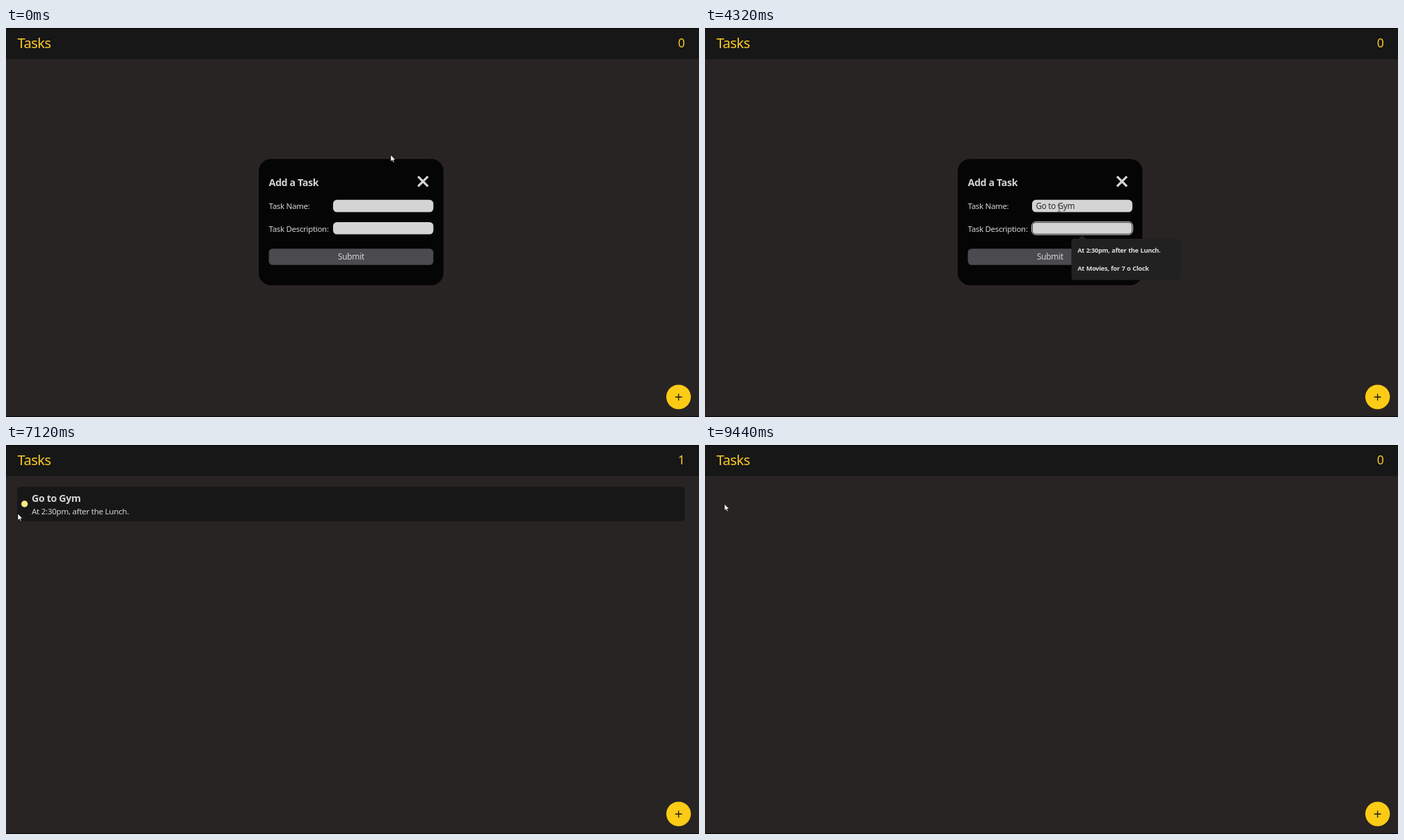
An HTML page for the animation above (9.52 s loop, 998x561 px).

```html
<!DOCTYPE html>
<html lang="en">
<head>
<meta charset="utf-8">
<title>Tasks</title>
<style>
  html, body { margin: 0; width: 100%; height: 100%; overflow: hidden; background: #292524; }
  svg { display: block; width: 998px; height: 561px; }
  text { font: 11.45px "Noto Sans", "Open Sans", sans-serif; letter-spacing: -.025em; fill: #d4d4d4; white-space: pre; }
  .brand { font-size: 20.2px; letter-spacing: -.03em; fill: #fbca24; }
  .count { font-size: 17.5px; fill: #fbca24; text-anchor: middle; letter-spacing: 0; }
  .title { font-size: 14.2px; font-weight: 600; }
  .entry { font-size: 11.75px; fill: #2c2c30; }
  .hint { font-size: 9.2px; font-weight: 700; letter-spacing: -.03em; word-spacing: .6px; fill: #dedede; }
  .ring rect { fill: none; stroke-width: .9; }
  .ring .out { stroke: #e0e0e0; }
  .ring .in { stroke: #111; }
</style>
</head>
<body>
<svg viewBox="0 0 998 561">
  <defs>
    <clipPath id="inner"><rect x="474" y="245" width="136" height="56"/></clipPath>
  </defs>
  <rect width="998" height="561" fill="#282423"/>
  <rect width="998" height="45" fill="#171717"/>
  <path d="M0 .5H998M0 560.5H998" stroke="#050505"/>
  <text class="brand" x="16.5" y="28.6">Tasks</text>
  <text class="count" id="count" x="972.7" y="27.6">0</text>

  <g id="task">
    <rect id="card" x="16" y="60" width="961.5" height="50" rx="5.5"/>
    <circle cx="26.7" cy="85" r="4.7" fill="#fdea86"/>
    <text class="title" x="37" y="82.2" fill="#e5e5e5">Go to Gym</text>
    <text x="37" y="100" style="font-size:11.6px">At 2:30pm, after the Lunch.</text>
  </g>

  <circle cx="968.6" cy="532.1" r="17.7" fill="#fccb16"/>
  <path d="M963.7 532.3H973.5M968.6 527.4V537.2" stroke="#1c1917" stroke-width="1.4"/>

  <g id="modal">
    <rect x="364" y="189" width="266" height="182" rx="17.5" fill="#050505"/>
    <text class="title" x="378.5" y="227.8">Add a Task</text>
    <path d="M593.4 214.2L607.6 228.4M607.6 214.2L593.4 228.4" stroke="#d6d6d6" stroke-width="3.2"/>
    <text x="378.5" y="261.2">Task Name:</text>
    <text x="378.5" y="293.5">Task Description:</text>
    <rect x="471" y="247.8" width="144.5" height="17.7" rx="5.5" fill="#d4d4d4"/>
    <rect id="descBox" x="471" y="279.9" width="144.5" height="17.7" rx="5.5"/>
    <rect x="378.5" y="318.2" width="237" height="23.6" rx="5.5" fill="#4a4a4f"/>
    <text x="497" y="334.4" text-anchor="middle" style="font-size:11.9px">Submit</text>
    <g id="rings"></g>
    <g clip-path="url(#inner)">
      <text class="entry" id="name" x="476.5" y="261.2"></text>
      <text class="entry" id="desc" x="476.5" y="293.5">At 2:30pm, after the Lunch.</text>
    </g>
    <rect id="caret" width="1" height="14.5" fill="#222"/>
    <g id="tip">
      <path d="M537 304.5L543 299L549 304.5Z" fill="#212121"/>
      <rect x="527.6" y="304" width="157.4" height="59.5" rx="4" fill="#212121"/>
      <rect id="pick" x="527.6" y="307.5" width="157.4" height="26" fill="#343434"/>
      <text class="hint" x="536.5" y="324">At 2:30pm, after the Lunch.</text>
      <text class="hint" x="536.5" y="350.3">At Movies, for 7 o Clock</text>
    </g>
  </g>

  <path id="arrow" d="M0 0V9.6L2.2 7.6L3.7 11L5.2 10.3L3.8 7.1H6.8Z" fill="#fff" stroke="#000" stroke-width=".6"/>
  <path id="beam" d="M-2.5 -4.9H-.6L0 -4.4L.6 -4.9H2.5M0 -4.4V4.4M-2.5 4.9H-.6L0 4.4L.6 4.9H2.5" fill="none" stroke="#4a4a4a" stroke-width=".9"/>
</svg>
<script>
const LOOP = 9520, STEP = 80;
const $ = id => document.getElementById(id);
const show = (el, on) => el.setAttribute("visibility", on ? "inherit" : "hidden");
const within = (t, a, b) => t >= a && t < b;

const NAME = "Go to Gym";
const KEYS = [1920, 2080, 2240, 2400, 2480, 2640, 3040, 3200, 3360];
const FOCUS_NAME = 1040, FOCUS_DESC = 3840, PREVIEW = 4640, PICK = 4800,
      FOCUS_SUBMIT = 5200, ADDED = 5840, HOVER = 7120, DONE = 8880;

// time, x, y of the pointer
const PATH = [
  [0, 554, 183], [80, 546, 202], [160, 528, 238], [240, 512, 265], [320, 506, 273],
  [400, 506, 273], [480, 508, 267], [560, 509, 262], [640, 510, 261], [720, 510, 261], [800, 510, 260],
  [5760, 510, 260], [5840, 509, 260], [6720, 509, 260], [6800, 370, 218], [6880, 150, 165],
  [6960, 0, 135], [7040, 0, 135], [7120, 17, 99], [7200, 21, 88], [7680, 25, 85],
  [7840, 25, 85], [8320, 26, 87], [8720, 28, 85], [LOOP, 28, 85]
];

function pointer(t) {
  const i = Math.max(1, PATH.findIndex(p => p[0] > t));
  const [a, b] = [PATH[i - 1], PATH[i]];
  const k = (t - a[0]) / (b[0] - a[0]);
  return [a[1] + (b[1] - a[1]) * k, a[2] + (b[2] - a[2]) * k];
}

function ring(x, y, w, h) {
  const box = (cls, d) =>
    `<rect class="${cls}" x="${x - d}" y="${y - d}" width="${w + 2 * d}" height="${h + 2 * d}" rx="${5.5 + d}"/>`;
  $("rings").insertAdjacentHTML("beforeend", `<g class="ring">${box("in", -.4)}${box("out", .5)}</g>`);
  return $("rings").lastElementChild;
}
const nameRing = ring(471, 247.8, 144.5, 17.7);
const descRing = ring(471, 279.9, 144.5, 17.7);
const submitRing = ring(378.5, 318.2, 237, 23.6);

function drawForm(t) {
  const typed = KEYS.filter(k => k <= t).length;
  $("name").textContent = NAME.slice(0, typed);
  show(nameRing, within(t, FOCUS_NAME, FOCUS_DESC));
  show(descRing, within(t, FOCUS_DESC, FOCUS_SUBMIT));
  show(submitRing, t >= FOCUS_SUBMIT);

  const filled = t >= PREVIEW;
  show($("desc"), filled);
  $("descBox").setAttribute("fill", filled ? "#c0c6da" : "#d4d4d4");

  // the caret blinks every half second after the last key
  const inDesc = t >= FOCUS_DESC;
  const since = inDesc ? FOCUS_DESC : typed ? KEYS[typed - 1] : FOCUS_NAME + 20;
  const lit = (t - since) % 1000 < (inDesc ? 480 : 500);
  show($("caret"), within(t, FOCUS_NAME, PREVIEW) && lit);
  const shift = inDesc || !typed ? 0 : $("name").getComputedTextLength();
  $("caret").setAttribute("x", 476 + Math.round(shift));
  $("caret").setAttribute("y", inDesc ? 281.5 : 249.5);

  const fadeIn = (t - FOCUS_DESC + STEP) / (2 * STEP);
  const fadeOut = 1 - (t - PICK + STEP) / (2 * STEP);
  $("tip").setAttribute("opacity", Math.max(0, Math.min(1, fadeIn, fadeOut)));
  show($("tip"), within(t, FOCUS_DESC, PICK + STEP));
  show($("pick"), t >= PREVIEW);
}

function draw(t) {
  const open = t < ADDED;
  const listed = within(t, ADDED, DONE);
  show($("modal"), open);
  show($("task"), listed);
  $("count").textContent = listed ? 1 : 0;
  $("card").setAttribute("fill", t >= HOVER ? "#171717" : "#45403c");
  if (open) drawForm(t);

  const typing = within(t, 480, ADDED);
  const [x, y] = pointer(t);
  for (const id of ["arrow", "beam"]) $(id).setAttribute("transform", `translate(${x} ${y})`);
  show($("arrow"), !typing);
  show($("beam"), typing);
}

const start = performance.now();
function tick() {
  const t = (performance.now() - start) % LOOP;
  draw(Math.floor(t / STEP) * STEP);
  requestAnimationFrame(tick);
}
tick();
</script>
</body>
</html>
```
